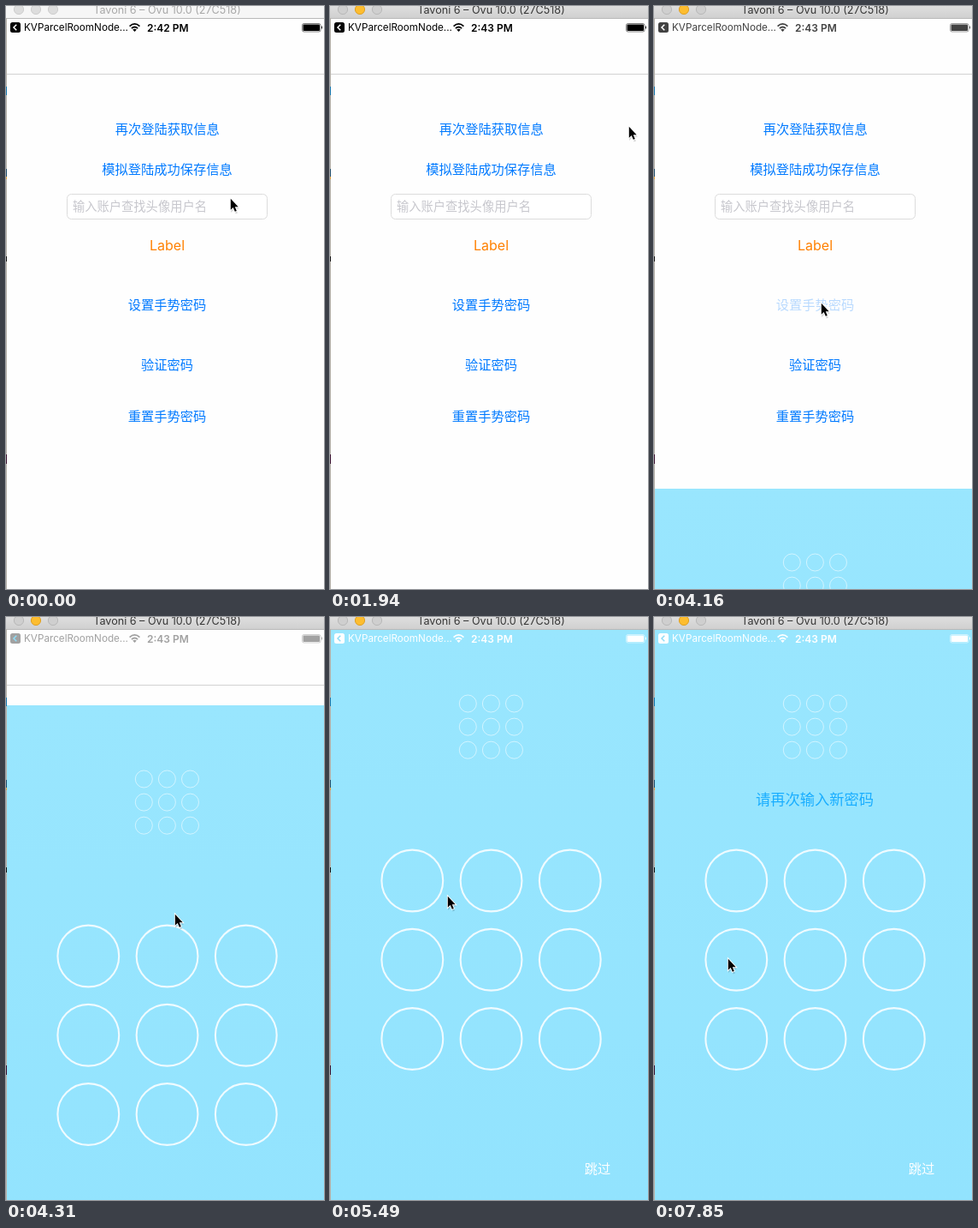
Recreate the animation shown at these times as an HTML page. Size 372 px wide and 680 px high, loop 8000 ms.

```html
<!DOCTYPE html>
<html lang="zh">
<head>
<meta charset="utf-8">
<style>
html, body { margin: 0; width: 100%; height: 100%; overflow: hidden; background: #fefefe; }
svg { display: block; width: 100vw; height: 100vh; }
text { font-family: Inter, "Noto Sans CJK SC", "Noto Sans CJK", sans-serif; text-anchor: middle; }
.link { fill: #007aff; font-size: 15.25px; }
#status text { font-size: 11.7px; text-anchor: start; }
#status #clock { font-size: 12px; font-weight: 600; }
.ring { fill: none; stroke: #fff; stroke-opacity: .85; stroke-width: 2.1; }
.ring.on { stroke: #00aaff; stroke-opacity: 1; }
.mini { fill: none; stroke: #fff; stroke-opacity: .55; }
.line { fill: none; stroke: #fff; stroke-width: 5; }
.line.thin { stroke-width: 2; }
</style>
</head>
<body>
<svg viewBox="0 0 372 680" preserveAspectRatio="none">
  <defs>
    <linearGradient id="sky" x2="0" y2="1">
      <stop stop-color="#99e6fe"/><stop offset="1" stop-color="#92e3fe"/>
    </linearGradient>
    <linearGradient id="chrome" x2="0" y2="1">
      <stop stop-color="#dedede"/><stop offset="1" stop-color="#d0d0d0"/>
    </linearGradient>
  </defs>

  <rect width="372" height="680" fill="#fefefe"/>
  <path d="M0 79.5H372" stroke="#d2d2d2"/>
  <g class="link">
    <text x="188.7" y="148.6">再次登陆获取信息</text>
    <text x="188.5" y="196.3">模拟登陆成功保存信息</text>
    <text id="setup" x="188.5" y="354.3">设置手势密码</text>
    <text x="188.5" y="424.3">验证密码</text>
    <text x="188.5" y="483.8">重置手势密码</text>
  </g>
  <rect x="71.5" y="219.5" width="234" height="29" rx="5" fill="#fff" stroke="#dcdcdc"/>
  <text x="156.5" y="239" font-size="14.27" fill="#c7c7cd">输入账户查找头像用户名</text>
  <text x="188.5" y="284.7" font-size="16" fill="#ff8000">Label</text>

  <g id="sheet">
    <rect y="15" width="372" height="665" fill="url(#sky)"/>
    <g id="minis"></g>
    <path id="miniLine" class="line thin"/>
    <path id="bigLine" class="line"/>
    <g id="dots"></g>
    <text id="hint" x="188" y="219.4" font-size="17.25" fill="#1aaeff">请再次输入新密码</text>
    <text x="313" y="649" font-size="15.25" fill="#fff">跳过</text>
  </g>

  <g id="status">
    <rect x="5" y="19" width="12" height="12" rx="2.5"/>
    <path id="chevron" d="M12.3 21.8L9 25L12.3 28.2" fill="none" stroke-width="1.5"/>
    <text x="21" y="29.3">KVParcelRoomNode...</text>
    <g fill="none" stroke="currentColor" stroke-width="1.8">
      <path d="M144.6 23.6Q150.5 18.2 156.4 23.6M146.9 26.1Q150.5 22.8 154.1 26.1"/>
    </g>
    <path d="M148.2 27.6Q150.5 25.7 152.8 27.6L150.5 30Z"/>
    <text id="clock" x="165" y="29.5"></text>
    <rect x="346.500" y="20.500" width="21.500" height="9.500" rx="2" fill="none" stroke="currentColor" stroke-opacity=".5"/>
    <rect x="347.500" y="21.500" width="19.500" height="7.500" rx="1"/>
    <path d="M369 23Q371 25 369 27Z"/>
  </g>

  <rect id="bar" width="372" height="14"/>
  <path d="M0 14.5H372" stroke="#b9b9b9"/>
  <g id="lights"></g>
  <text id="title" x="188.5" y="8.9" font-size="12.6">Tavoni 6 – Ovu 10.0 (27C518)</text>

  <path d="M.5 14V680" stroke="#b7b2aa"/>
  <path d="M.5 94v10" stroke="#1778b0"/>
  <path d="M.5 190v9" stroke="#24506e"/>
  <path d="M.5 199v3" stroke="#e0a040"/>
  <path d="M.5 292v6" stroke="#111"/>
  <path d="M.5 523v11" stroke="#3a1030"/>

  <g id="cursor">
    <path d="M1 2V17L4.500 13.800L6.800 18.500L9 17.500L7 12.800H11Z" opacity=".15"/>
    <path d="M.8 .8V13.800L3.700 11.100L5.800 15.800L7.800 14.900L5.800 10.300H9.700Z"
      stroke="#fff" stroke-width="1.8" paint-order="stroke"/>
  </g>
</svg>
<script>
const LOOP = 8000, START = 600, TICK = 147.9, LAST = 49;
const $ = id => document.getElementById(id);

// Cursor path: tick, x, y
const path = [
  [-1, 262, 224], [3, 300, 190], [7, 340, 142], [9, 349, 140], [12, 338, 270],
  [15, 297, 418], [18, 211, 352], [19, 211, 352], [21, 195, 346], [24, 195, 346],
  [27, 200, 345], [30, 200, 345], [33, 137, 325], [35, 98, 392], [36, 132, 399],
  [37, 174, 398], [38, 213, 388], [39, 261, 371], [41, 286, 470], [42, 278, 490],
  [43, 262, 486], [46, 160, 417], [49, 86, 398]
];
// Pattern: tick, node
const touches = [[35, 3], [37, 4], [39, 5], [41, 8]];
const RELEASE = 43;

const big = i => [96.3 + i % 3 * 92.25, 307.5 + Math.floor(i / 3) * 92.25];
const mini = i => [161.3 + i % 3 * 27.1, 101 + Math.floor(i / 3) * 27.1];
const disc = ([x, y], r, attrs) => `<circle cx="${x}" cy="${y}" r="${r}" ${attrs}/>`;
const nodes = [...Array(9).keys()];
const route = (list, at) => list.length > 1 ? "M" + list.map(i => at(i).join()).join("L") : "";
const clamp = v => Math.min(1, Math.max(0, v));

$("minis").innerHTML = nodes.map(i => disc(mini(i), 10, 'class="mini"')).join("");

function cursorAt(n) {
  let k = 0;
  while (k < path.length - 2 && path[k + 1][0] <= n) k++;
  const [a, ax, ay] = path[k], [b, bx, by] = path[k + 1];
  const p = clamp((n - a) / (b - a));
  return [ax + (bx - ax) * p, ay + (by - ay) * p].map(Math.round);
}

function node(i, chosen) {
  const c = big(i), k = chosen.indexOf(i);
  if (k < 0) return disc(c, 35.9, 'class="ring"');
  let s = disc(c, 35.9, 'class="ring on"')
    + disc(c, 27, 'fill="#00bfff" fill-opacity=".35"')
    + disc(c, 18, 'fill="#00bfff"');
  if (k < chosen.length - 1) {
    const [x, y] = big(chosen[k + 1]);
    const turn = Math.atan2(y - c[1], x - c[0]) * 180 / Math.PI;
    s += `<path d="M23 -5.5L32 0L23 5.5Z" fill="#12b6fa" transform="translate(${c}) rotate(${turn})"/>`;
  }
  return s;
}

// Critically damped spring, distance still to travel
function sheetOffset(n) {
  const w = Math.max(0, n - 23.728) * 2.78;
  return Math.round(665 * (1 + w) * Math.exp(-w));
}

function draw(n) {
  const active = n >= 8;
  $("bar").setAttribute("fill", active ? "url(#chrome)" : "#f6f6f6");
  $("title").setAttribute("fill", active ? "#363636" : "#a8a8a8");
  $("lights").innerHTML = [15, 35, 55].map((x, i) => {
    const lit = active && i === 1;
    return disc([x, 4], 5.6, lit ? 'fill="#fdbd2f" stroke="#dfa023"'
      : `fill="${active ? "#cfcfcf" : "#dddddd"}" stroke="${active ? "#b8b8b8" : "#cdcdcd"}"`);
  }).join("");

  $("clock").textContent = n < 4 ? "2:42 PM" : "2:43 PM";
  const fade = clamp((n - 23.3) / 2.7), tone = Math.round(255 * fade);
  $("status").setAttribute("fill", `rgb(${tone},${tone},${tone})`);
  $("status").style.color = `rgb(${tone},${tone},${tone})`;
  $("chevron").setAttribute("stroke", fade < .5 ? "#fff" : "#8edcf6");

  $("setup").setAttribute("opacity", n >= 23 ? .27 : 1);
  $("sheet").setAttribute("transform", `translate(0 ${sheetOffset(n)})`);

  const chosen = n < RELEASE ? touches.filter(t => t[0] <= n).map(t => t[1]) : [];
  $("dots").innerHTML = nodes.map(i => node(i, chosen)).join("");
  $("bigLine").setAttribute("d", route(chosen, big));
  $("miniLine").setAttribute("d", route(chosen, mini));
  $("hint").setAttribute("opacity", n >= RELEASE ? 1 : 0);

  $("cursor").setAttribute("transform", `translate(${cursorAt(n)})`);
}

const begin = performance.now();
let shown = null;
function frame() {
  const t = (performance.now() - begin) % LOOP;
  const n = Math.max(-1, Math.min(LAST, Math.floor((t - START) / TICK)));
  if (n !== shown) draw(shown = n);
  requestAnimationFrame(frame);
}
frame();
</script>
</body>
</html>
```
